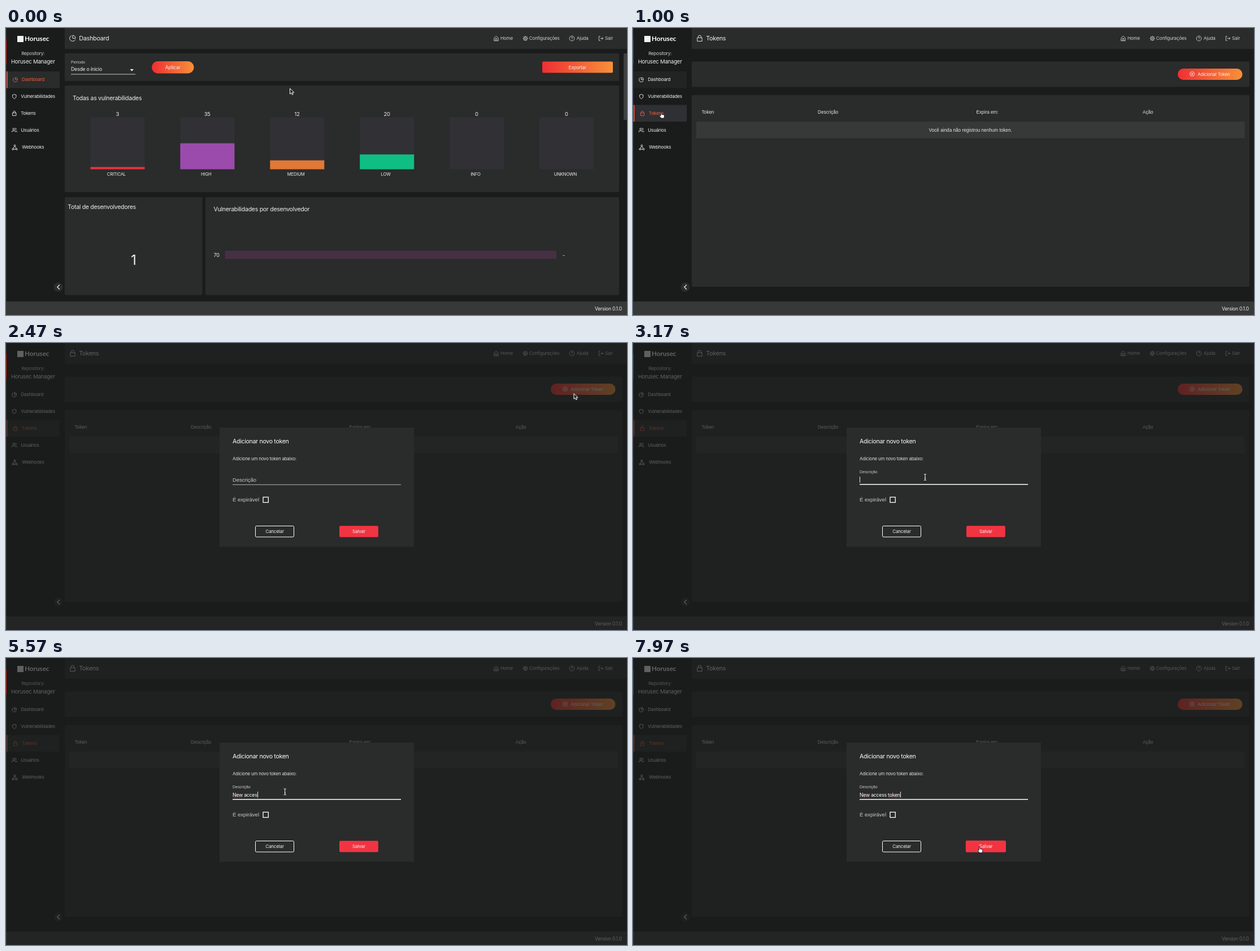
Recreate the animation shown at these times as an HTML page with a canvas. Size 1099 by 509 pixels, loop 8000 ms.

```html
<!DOCTYPE html>
<html lang="pt-BR">
<head>
<meta charset="utf-8">
<title>Token</title>
<style>
html, body { margin: 0; height: 100%; overflow: hidden; background: #1a1c1b; }
canvas { display: block; }
</style>
</head>
<body>
<canvas width="1099" height="509"></canvas>
<script>
const c = document.querySelector('canvas').getContext('2d');
const SANS = 'Inter, sans-serif', ARIAL = '"Liberation Sans", Arial, sans-serif';
const BG = '#1a1c1b', PANEL = '#2a2b2b', ROW = '#373838', LIGHT = '#f0f0f0', SOFT = '#cfcfcf', ACCENT = '#ee5f3f';
const ring = (x, y, r) => `M${x - r} ${y}a${r} ${r} 0 1 0 ${2 * r} 0a${r} ${r} 0 1 0 ${-2 * r} 0`;
const ICONS = {
  pie: 'M21 16A10 10 0 1 1 8 2.8M22 12A10 10 0 0 0 12 2v10z',
  shield: 'M12 22s8-4 8-10V5l-8-3-8 3v7c0 6 8 10 8 10z',
  lock: 'M4 10h16v12H4zM7 10V7a5 5 0 0 1 10 0v3',
  users: 'M17 21v-2a4 4 0 0 0-4-4H5a4 4 0 0 0-4 4v2M23 21v-2a4 4 0 0 0-3-4M16 3a4 4 0 0 1 0 8' + ring(9, 7, 4),
  hook: 'M11 8L6 16M13 8l5 8M8 19h8' + ring(12, 5, 3) + ring(5, 19, 3) + ring(19, 19, 3),
  home: 'M3 10l9-8 9 8v12H3zM9 22V12h6v10',
  gear: 'M12 1v4M12 19v4M1 12h4M19 12h4M4 4l3 3M17 17l3 3M4 20l3-3M17 7l3-3' + ring(12, 12, 7.5) + ring(12, 12, 3),
  help: 'M9 9a3 3 0 1 1 4 3l-1 1v1M12 17v1' + ring(12, 12, 10.5),
  exit: 'M9 21H3V3h6M16 17l5-5-5-5M21 12H9',
  plus: 'M12 7v10M7 12h10' + ring(12, 12, 10.5)
};
const ARROW = new Path2D('M0 0v9.8l2.3-2 1.6 3.4 1.7-.8-1.6-3.3h3.2z');
const HAND = new Path2D('M-1 .2q1-1 1.8 0v3.6l3.6.7q1.4.4 1.2 2l-.7 4H-.3L-3.4 6.4q.4-1.4 2.4 0z');
const BEAM = new Path2D('M-2-5.5q2 0 2 1.2V4.3q0 1.2-2 1.2M2-5.5q-2 0-2 1.2M0 4.3q0 1.2 2 1.2M-1 2h2');

function text(s, x, y, size, { color = LIGHT, font = SANS, align = 'left', weight = 400 } = {}) {
  c.font = `${weight} ${size}px ${font}`;
  c.letterSpacing = font === SANS ? `${-.025 * size}px` : '0px';
  c.textAlign = align;
  c.fillStyle = color;
  c.fillText(s, x, y);
}
const mid = (s, x, y, size, o) => text(s, x, y, size, { ...o, align: 'center' });

function box(x, y, w, h, color, r = 0) {
  c.fillStyle = color;
  c.beginPath();
  c.roundRect(x, y, w, h, r);
  c.fill();
}

function icon(name, x, y, size, color = LIGHT) {
  c.save();
  c.translate(x, y);
  c.scale(size / 24, size / 24);
  c.strokeStyle = color;
  c.lineWidth = 22 / size;
  c.stroke(new Path2D(ICONS[name]));
  c.restore();
}

function warm(x, y, w, h, r) {
  const g = c.createLinearGradient(x, 0, x + w, 0);
  g.addColorStop(0, '#ef2f33');
  g.addColorStop(1, '#f6913a');
  box(x, y, w, h, g, r);
}

function grown(x, y, k, draw) {
  c.save();
  c.translate(x, y);
  c.scale(k, k);
  c.translate(-x, -y);
  draw();
  c.restore();
}

function sidebar(t, tokens, hover) {
  box(20, 14, 11, 11, '#f2f2f2');
  text('Horusec', 33, 23.4, 11.7, { font: 'Lato, sans-serif', weight: 700, color: '#fff' });
  mid('Repository:', 47.7, 48, 8.1, { color: SOFT });
  mid('Horusec Manager', 47.7, 62.8, 9.6);
  const items = [['pie', 'Dashboard'], ['shield', 'Vulnerabilidades'], ['lock', 'Tokens'], ['users', 'Usuários'], ['hook', 'Webhooks']];
  items.forEach(([name, label], i) => {
    const y = 91.5 + 29.8 * i, on = i === (tokens ? 2 : 0), over = i === 2 && hover;
    if (on || over) box(1, y - 14.5, 94, 29.5, over && on ? '#2f3033' : PANEL);
    else if (i === 0 && t < 2200) box(1, y - 14.5, 94, 29.5, '#222424');
    if (on) box(1, y - 14.5, 1.6, 29.5, ACCENT);
    const dx = on ? 1.8 : 0, color = on ? ACCENT : LIGHT;
    icon(name, 10 + dx, y - 4.5, i === 4 ? 11 : 9.5, color);
    text(label, (i === 4 ? 28.3 : 26.2) + dx, y + 2.9, 8.15, { color });
  });
  c.fillStyle = '#2c2d2d';
  c.beginPath();
  c.arc(92.5, 459.5, 8, 0, 7);
  c.fill();
  c.strokeStyle = LIGHT;
  c.lineWidth = 1.2;
  c.stroke(new Path2D('M94.8 455.5l-4 4 4 4'));
}

function header(tokens) {
  box(104, 0, 995, 37, PANEL);
  icon(tokens ? 'lock' : 'pie', 111.7, 12, 12.5);
  text(tokens ? 'Tokens' : 'Dashboard', 129.2, 22.4, 10.8);
  const links = [['home', 862.5, 'Home', 875], ['gear', 914.2, 'Configurações', 925.8], ['help', 996.5, 'Ajuda', 1009.8], ['exit', 1048, 'Sair', 1060]];
  for (const [name, x, label, tx] of links) {
    icon(name, x, 13.5, 10, SOFT);
    text(label, tx, 21.3, 8.15, { color: SOFT });
  }
}

function dashboard() {
  box(104, 45, 981, 49, PANEL, 2);
  text('Período', 115, 63, 7.1, { font: ARIAL, color: SOFT });
  text('Desde o ínicio', 115, 76, 8.7);
  box(115, 81.5, 114, 1, '#c8c8c8');
  c.fillStyle = '#fff';
  c.fill(new Path2D('M219.5 73h6.4l-3.2 3.4z'));
  warm(258, 59, 74.5, 21.5, 11);
  mid('Aplicar', 295.3, 72.8, 8.6);
  warm(949, 59.5, 125, 20, 2);
  mid('Exportar', 1011.3, 72.8, 8.1);

  box(104, 102, 981, 189, PANEL, 2);
  text('Todas as vulnerabilidades', 118, 127.8, 10.5);
  const bars = [['CRITICAL', 3, '#e9343b'], ['HIGH', 35, '#9b4bac'], ['MEDIUM', 12, '#e27834'], ['LOW', 20, '#0fbe83'], ['INFO', 0], ['UNKNOWN', 0]];
  bars.forEach(([label, n, color], i) => {
    const x = 149.5 + 158.9 * i, h = n / 70 * 92;
    box(x, 158.5, 96, 92, '#313135');
    if (n) box(x, 250.5 - h, 96, h, color);
    mid(n, x + 47.8, 156.4, 9.4);
    mid(label, x + 45.9, 262, 7.7);
  });

  box(104, 300, 243.5, 173.5, PANEL, 2);
  text('Total de desenvolvedores', 109.3, 320.8, 10.45);
  mid('1', 225.5, 419.6, 24);
  box(353, 300, 732, 173.5, PANEL, 2);
  text('Vulnerabilidades por desenvolvedor', 367.5, 325, 10.5);
  text('70', 367.5, 405.8, 9);
  box(387.5, 395, 586.5, 14.5, '#463044');
  text('-', 985, 405.5, 9);
  box(1093, 45, 6, 118, '#3f4040', 1);
}

function tokenPage(hover) {
  box(104, 59.5, 987, 45, PANEL, 2);
  grown(1021, 82, hover ? 1.033 : 1, () => {
    warm(964, 72, 114.5, 20, 10);
    icon('plus', 985, 77, 9);
    text('Adicionar Token', 999.3, 85.3, 7.9);
  });
  box(104, 119, 987, 340, PANEL, 2);
  const o = { font: ARIAL, color: '#e4e4e4' };
  [['Token', 121.5], ['Descrição', 327], ['Expira em:', 607.5], ['Ação', 902]].forEach(([s, x]) => text(s, x, 152.2, 8.2, o));
  box(112, 166, 970.5, 29.5, ROW);
  mid('Você ainda não registrou nenhum token.', 597.2, 183.8, 8.2, o);
}

const TYPED = 'New access token';
const KEYS = [4170, 4270, 4370, 4470, 4630, 4830, 5200, 5270, 5570, 5700, 6000, 6170, 6270, 6470, 6570, 6770];

function squiggle(x, w) {
  c.strokeStyle = '#c8323c';
  c.lineWidth = .9;
  c.setLineDash([1.6, .8]);
  c.beginPath();
  c.moveTo(x, 246.8);
  c.lineTo(x + w, 246.8);
  c.stroke();
  c.setLineDash([]);
}

function modal(t, hover) {
  box(1, 0, 1098, 509, 'rgba(26,28,27,.68)');
  box(378, 150, 344, 211.5, PANEL, 1);
  text('Adicionar novo token', 401, 177.5, 10.5, { color: '#fff' });
  text('Adicione um novo token abaixo:', 401, 207.8, 7.9, { color: '#dedede' });
  const focus = t >= 3030, o = { font: ARIAL, color: '#c9c9c9' };
  if (focus) text('Descrição', 401, 230.6, 7.15, o);
  else text('Descrição', 401, 245.6, 9.45, o);
  if (focus) box(401, 250, 298, 1.5, '#fff');
  else box(401, 250.7, 298, 1, '#b4b4b4');

  const shown = TYPED.slice(0, KEYS.filter(k => k <= t).length);
  text(shown, 401, 245.7, 8.7, { color: '#fff' });
  const end = 401 + c.measureText(shown).width;
  if (t >= 4530) squiggle(401.5, 17.5);
  if (t >= 7530) squiggle(451, 21.5);
  const blink = t >= 3770 && t < 4170 || t >= 7370 && t < 7870;
  if (focus && !blink) box(Math.round(end), 237, .9, 10.5, '#fff');

  text('É expirável', 401, 280.7, 9.5, o);
  c.strokeStyle = '#fff';
  c.lineWidth = 1.3;
  c.strokeRect(455, 273.4, 9.3, 9.3);
  c.lineWidth = 1;
  c.beginPath();
  c.roundRect(441.5, 324.5, 68, 19.5, 2);
  c.stroke();
  mid('Cancelar', 475.5, 337.2, 8.1);
  grown(624.4, 334.2, hover ? 1.035 : 1, () => {
    box(590, 324.2, 68.8, 20, '#f23442', 2);
    mid('Salvar', 624.4, 337.2, 8.2);
  });
}

// time, x, y, downward bow of the way there
const TRACK = [[100, 502.5, 107.2, 0], [730, 50, 149.5, 0], [1330, 50, 149.5, 0], [2130, 1001, 93.5, 125], [2400, 1005, 89.6, 0],
  [2570, 1005, 89.6, 0], [2970, 517, 238, 0], [3170, 517, 238, 0], [3500, 493.7, 237.3, 0], [7530, 493.7, 237.3, 0], [7970, 613.3, 334.8, 0]];

function pointer(t) {
  const i = TRACK.findIndex(k => t < k[0]);
  if (i < 1) return TRACK[i ? TRACK.length - 1 : 0].slice(1, 3);
  const [t0, x0, y0] = TRACK[i - 1], [t1, x1, y1, bow] = TRACK[i];
  const p = (t - t0) / (t1 - t0), e = p * p * (3 - 2 * p);
  return [x0 + (x1 - x0) * e, y0 + (y1 - y0) * e + bow * Math.sin(Math.PI * e)];
}

function cursor(x, y, hand, beam) {
  c.save();
  c.translate(x, y);
  c.lineJoin = 'round';
  c.lineWidth = 1;
  c.strokeStyle = hand ? '#222' : '#fff';
  c.fillStyle = hand ? '#fff' : '#1c1c1c';
  const shape = hand ? HAND : beam ? BEAM : ARROW;
  if (!beam) c.fill(shape);
  c.stroke(shape);
  c.restore();
}

function draw(t) {
  const tokens = t >= 1000, open = t >= 2470, [x, y] = pointer(t);
  const side = !open && x < 95 && y > 77 && y < 226;
  const save = open && x > 590 && x < 659 && y > 324 && y < 344;
  const field = open && x > 401 && x < 699 && y > 225 && y < 252;
  box(0, 0, 1099, 509, BG);
  sidebar(t, tokens, side && y > 136.5 && y < 166);
  header(tokens);
  if (tokens) tokenPage(t >= 2200 && !open);
  else dashboard();
  box(0, 485, 1099, 24, ROW);
  text('Version 0.1.0', 1042, 500.8, 8.5);
  if (open) modal(t, save);
  box(0, 0, 1, 485, '#2d2f2e');
  box(0, 20, 1, 44, '#b3200f');
  cursor(x, y, side || save, field);
}

const start = performance.now();
function tick() {
  draw((performance.now() - start) % 8000);
  requestAnimationFrame(tick);
}
tick();
</script>
</body>
</html>
```
